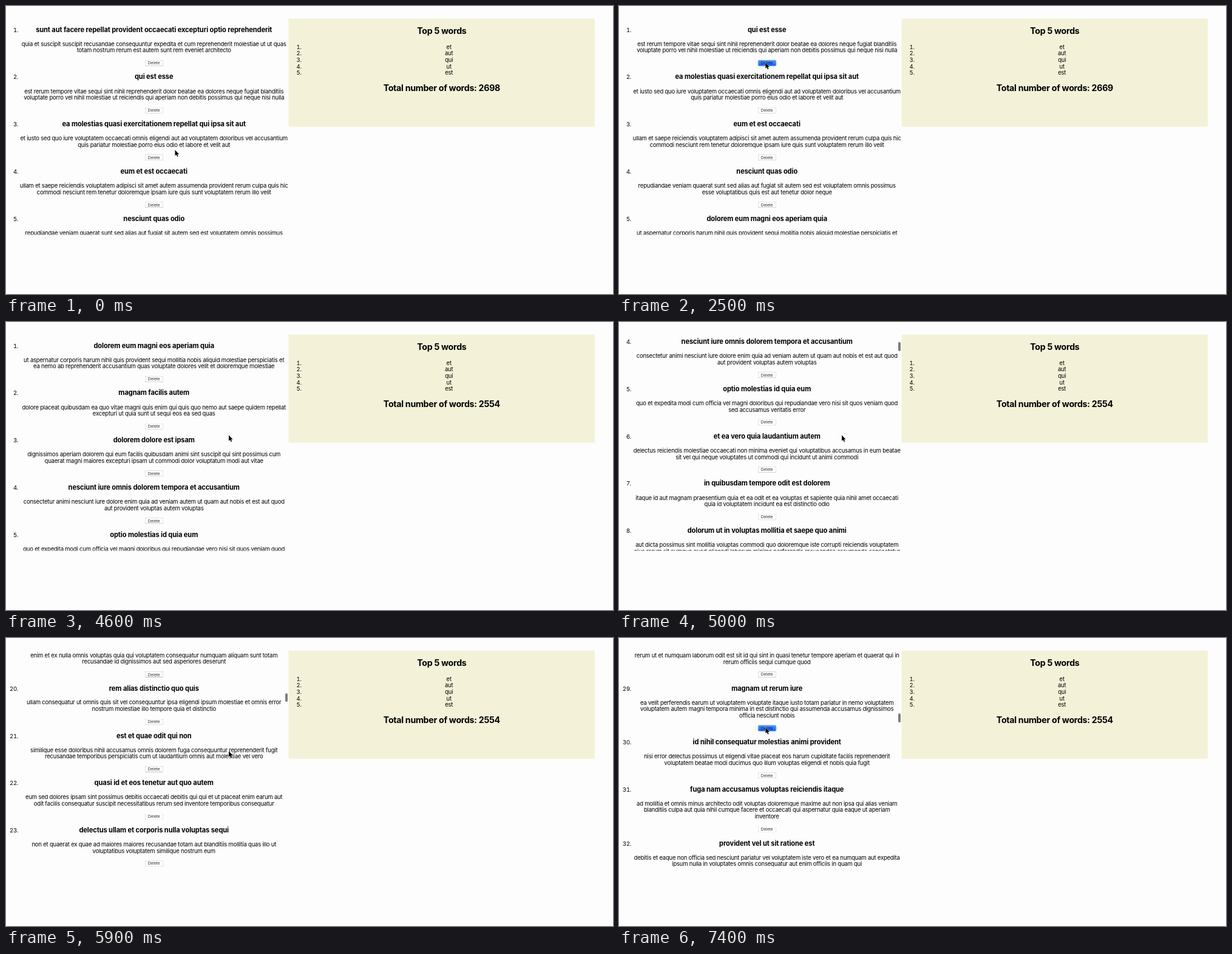
Write an HTML page that moves like this. It is 1000x474 px and loops after 7.5 s.

```html
<!DOCTYPE html>
<html lang="en">
<head>
<meta charset="utf-8">
<title>Word counter</title>
<style>
  html, body { margin: 0; width: 100%; height: 100%; overflow: hidden; background: #fdfdfd; }
  #stage { position: relative; width: 1000px; height: 474px; overflow: hidden; }
  #page {
    position: absolute; left: 0; top: 0; width: 1686px; height: 799px;
    transform: scale(.593); transform-origin: 0 0;
    font: 16px/18px Inter, sans-serif; letter-spacing: -.021em; color: #000; text-align: center;
  }
  #posts { position: absolute; left: -2px; top: 35.4px; width: 786px; height: 600px; overflow: hidden; }
  #posts ol, #stats > * { position: relative; top: 1px; }
  ol { margin: 0; padding: 0 0 0 40px; }
  #posts li { display: flow-root list-item; height: var(--h); }
  h3 { margin: 18.7px 0; font-size: 18.72px; line-height: 22px; letter-spacing: -.009em; }
  p { margin: 0 -20px 16px; white-space: pre; }
  button {
    display: block; box-sizing: border-box; width: 51px; height: 17px; margin: 0 auto; padding: 0;
    position: relative; top: 2px; border: 1px solid #c4c4c4; border-bottom-color: #a8a8a8; border-radius: 4px;
    background: #fff; color: #2a2a2a; font: 11px/14px Inter, sans-serif; letter-spacing: 0;
  }
  button.down { background: linear-gradient(#4f97fb, #1462f2); border-color: #2f74e6; color: #0a1c48; }
  #stats { position: absolute; left: 785px; top: 35.4px; width: 851px; height: 300px; background: #f3f2d8; }
  h2 { margin: 19.9px 0; font-size: 24px; line-height: 28px; letter-spacing: -.022em; }
  #thumb { position: absolute; left: 460px; width: 4.4px; height: 14.5px; border-radius: 2.2px; background: #7d7d7d; }
  #cursor { position: absolute; left: 0; top: 0; width: 10px; height: 14px; overflow: visible; }
</style>
</head>
<body>
<div id="stage">
  <div id="page">
    <div id="posts"><ol id="list"></ol></div>
    <div id="stats">
      <h2>Top 5 words</h2>
      <ol><li>et</li><li>aut</li><li>qui</li><li>ut</li><li>est</li></ol>
      <h2>Total number of words: <span id="total"></span></h2>
    </div>
  </div>
  <div id="thumb"></div>
  <svg id="cursor"><path d="M0 0V9.4L2.1 7.5 3.6 10.9 5.2 10.2 3.7 6.9H6.6Z" fill="#000" stroke="#fff" stroke-width=".8" paint-order="stroke"/></svg>
</div>
<script>
// One post per block: title, then the lines of its body.
const POSTS = `sunt aut facere repellat provident occaecati excepturi optio reprehenderit
quia et suscipit suscipit recusandae consequuntur expedita et cum reprehenderit molestiae ut ut quas
totam nostrum rerum est autem sunt rem eveniet architecto

qui est esse
est rerum tempore vitae sequi sint nihil reprehenderit dolor beatae ea dolores neque fugiat blanditiis
voluptate porro vel nihil molestiae ut reiciendis qui aperiam non debitis possimus qui neque nisi nulla

ea molestias quasi exercitationem repellat qui ipsa sit aut
et iusto sed quo iure voluptatem occaecati omnis eligendi aut ad voluptatem doloribus vel accusantium
quis pariatur molestiae porro eius odio et labore et velit aut

eum et est occaecati
ullam et saepe reiciendis voluptatem adipisci sit amet autem assumenda provident rerum culpa quis hic
commodi nesciunt rem tenetur doloremque ipsam iure quis sunt voluptatem rerum illo velit

nesciunt quas odio
repudiandae veniam quaerat sunt sed alias aut fugiat sit autem sed est voluptatem omnis possimus
esse voluptatibus quis est aut tenetur dolor neque

dolorem eum magni eos aperiam quia
ut aspernatur corporis harum nihil quis provident sequi mollitia nobis aliquid molestiae perspiciatis et
ea nemo ab reprehenderit accusantium quas voluptate dolores velit et doloremque molestiae

magnam facilis autem
dolore placeat quibusdam ea quo vitae magni quis enim qui quis quo nemo aut saepe quidem repellat
excepturi ut quia sunt ut sequi eos ea sed quas

dolorem dolore est ipsam
dignissimos aperiam dolorem qui eum facilis quibusdam animi sint suscipit qui sint possimus cum
quaerat magni maiores excepturi ipsam ut commodi dolor voluptatum modi aut vitae

nesciunt iure omnis dolorem tempora et accusantium
consectetur animi nesciunt iure dolore enim quia ad veniam autem ut quam aut nobis et est aut quod
aut provident voluptas autem voluptas

optio molestias id quia eum
quo et expedita modi cum officia vel magni doloribus qui repudiandae vero nisi sit quos veniam quod
sed accusamus veritatis error

et ea vero quia laudantium autem
delectus reiciendis molestiae occaecati non minima eveniet qui voluptatibus accusamus in eum beatae
sit vel qui neque voluptates ut commodi qui incidunt ut animi commodi

in quibusdam tempore odit est dolorem
itaque id aut magnam praesentium quia et ea odit et ea voluptas et sapiente quia nihil amet occaecati
quia id voluptatem incidunt ea est distinctio odio

dolorum ut in voluptas mollitia et saepe quo animi
aut dicta possimus sint mollitia voluptas commodi quo doloremque iste corrupti reiciendis voluptatem
eius rerum sit cumque quod eligendi laborum minima perferendis recusandae assumenda consectetur
porro architecto ipsum ipsam

voluptatem eligendi optio
fuga et accusamus dolorum perferendis illo voluptas non doloremque neque facere ad qui dolorum
molestiae beatae sed aut voluptas totam sit illum

eveniet quod temporibus
reprehenderit quos placeat velit minima officia dolores impedit repudiandae molestiae nam voluptas
recusandae quis delectus officiis harum fugiat vitae

sint suscipit perspiciatis velit dolorum rerum ipsa laboriosam odio
suscipit nam nisi quo aperiam aut asperiores eos fugit maiores voluptatibus quia voluptatem quis ullam
qui in alias quia est consequatur magni mollitia accusamus ea nisi voluptate dicta

fugit voluptas sed molestias voluptatem provident
eos voluptas et aut odit natus earum aspernatur fuga molestiae ullam deserunt ratione qui eos qui nihil
ratione nemo velit ut aut id quo

voluptate et itaque vero tempora molestiae
eveniet quo quis laborum totam consequatur non dolor ut et est repudiandae est voluptatem vel debitis
et magnam

adipisci placeat illum aut reiciendis qui
illum quis cupiditate provident sit magnam ea sed aut omnis veniam maiores ullam consequatur atque
adipisci quo iste expedita sit quos voluptas

doloribus ad provident suscipit at
qui consequuntur ducimus possimus quisquam amet similique suscipit porro ipsam amet eos veritatis
officiis exercitationem vel fugit aut necessitatibus totam omnis rerum consequatur expedita quidem
cumque explicabo

asperiores ea ipsam voluptatibus modi minima quia sint
repellat aliquid praesentium dolorem quo sed totam minus non itaque nihil labore molestiae sunt dolor
eveniet hic recusandae veniam tempora et tenetur expedita sunt

dolor sint quo a velit explicabo quia nam
eos qui et ipsum ipsam suscipit aut sed omnis non odio expedita earum mollitia molestiae aut atque
rem suscipit nam impedit esse

maxime id vitae nihil numquam
veritatis unde neque eligendi quae quod architecto quo neque vitae est illo sit tempora doloremque
fugit quod et et vel beatae sequi ullam sed tenetur perspiciatis

autem hic labore sunt dolores incidunt
enim et ex nulla omnis voluptas quia qui voluptatem consequatur numquam aliquam sunt totam
recusandae id dignissimos aut sed asperiores deserunt

rem alias distinctio quo quis
ullam consequatur ut omnis quis sit vel consequuntur ipsa eligendi ipsum molestiae et omnis error
nostrum molestiae illo tempore quia et distinctio

est et quae odit qui non
similique esse doloribus nihil accusamus omnis dolorem fuga consequuntur reprehenderit fugit
recusandae temporibus perspiciatis cum ut laudantium omnis aut molestiae vel vero

quasi id et eos tenetur aut quo autem
eum sed dolores ipsam sint possimus debitis occaecati debitis qui qui et ut placeat enim earum aut
odit facilis consequatur suscipit necessitatibus rerum sed inventore temporibus consequatur

delectus ullam et corporis nulla voluptas sequi
non et quaerat ex quae ad maiores maiores recusandae totam aut blanditiis mollitia quas illo ut
voluptatibus voluptatem similique nostrum eum

iusto eius quod necessitatibus culpa ea
odit magnam ut saepe sed non qui tempora atque nihil accusamus illum doloribus illo dolor eligendi
repudiandae odit magni similique sed cum maiores

a quo magni similique perferendis
alias dolor cumque impedit blanditiis non eveniet odio maxime blanditiis amet eius quis tempora quia
autem rem a provident perspiciatis quia

ullam ut quidem id aut vel consequuntur
debitis eius sed quibusdam non quis consectetur vitae impedit ut qui consequatur sed aut in quidem
sit nostrum et maiores adipisci atque quaerat voluptatem adipisci repudiandae

doloremque illum aliquid sunt
deserunt eos nobis asperiores et hic est debitis repellat molestiae optio nihil ratione ut eos beatae
quibusdam distinctio maiores earum voluptates et aut adipisci ea maiores voluptas maxime

qui explicabo molestiae dolorem
rerum ut et numquam laborum odit est sit id qui sint in quasi tenetur tempore aperiam et quaerat qui in
rerum officiis sequi cumque quod

magnam ut rerum iure
ea velit perferendis earum ut voluptatem voluptate itaque iusto totam pariatur in nemo voluptatem
voluptatem autem magni tempora minima in est distinctio qui assumenda accusamus dignissimos
officia nesciunt nobis

id nihil consequatur molestias animi provident
nisi error delectus possimus ut eligendi vitae placeat eos harum cupiditate facilis reprehenderit
voluptatem beatae modi ducimus quo illum voluptas eligendi et nobis quia fugit

fuga nam accusamus voluptas reiciendis itaque
ad mollitia et omnis minus architecto odit voluptas doloremque maxime aut non ipsa qui alias veniam
blanditiis culpa aut quia nihil cumque facere et occaecati qui aspernatur quia eaque ut aperiam
inventore

provident vel ut sit ratione est
debitis et eaque non officia sed nesciunt pariatur vel voluptatem iste vero et ea numquam aut expedita
ipsum nulla in voluptates omnis consequatur aut enim officiis in quam qui`;

const LOOP = 7500, STEP = 100, SCALE = .593;
const TOTALS = [2698, 2669, 2638, 2606, 2577, 2554];
// [press, release]; each release but the last deletes the first post.
const CLICKS = [[1700, 2000], [2300, 2600], [3000, 3200], [3600, 3800], [4000, 4200], [7100, LOOP]];
const SCROLL = [[4700, 0], [4800, 22], [4900, 120], [5000, 240], [5100, 300], [5300, 300], [5400, 390], [5500, 586.2],
  [5700, 1130], [5900, 1455.5], [6000, 1530], [6100, 1570], [6200, 1780], [6300, 2010], [6400, 2125], [6500, 2155.6]];
const POINTER = [[0, 278.5, 237], [200, 225, 205], [400, 173, 150], [600, 205, 112], [800, 240.5, 95.5], [900, 241, 93.8],
  [1000, 241, 93.8], [1100, 241.3, 93.3], [4200, 241.3, 93.3], [4300, 262, 110], [4400, 310, 150], [4500, 352, 180],
  [4600, 367, 186.3], [6400, 367, 186.3], [6500, 327, 182.5], [6700, 268, 160], [6900, 241.5, 147.5]];

const $ = id => document.getElementById(id);
const list = $('list'), thumb = $('thumb'), cursor = $('cursor'), total = $('total');

const add = (parent, tag, text = '') => {
  const el = parent.appendChild(document.createElement(tag));
  el.textContent = text;
  return el;
};

const items = POSTS.split('\n\n').map(post => {
  const [title, ...lines] = post.split('\n');
  const li = add(list, 'li');
  li.style.setProperty('--h', 95.2 + 18 * lines.length + 'px');
  add(li, 'h3', title);
  add(li, 'p', lines.join('\n'));
  return { li, button: add(li, 'button', 'Delete') };
});

// Linear interpolation through rows of [time, ...values].
function at(keys, t) {
  const i = keys.findIndex(k => k[0] > t);
  if (i === 0) return keys[0].slice(1);
  if (i < 0) return keys[keys.length - 1].slice(1);
  const a = keys[i - 1], b = keys[i], u = (t - a[0]) / (b[0] - a[0]);
  return a.slice(1).map((v, n) => v + (b[n + 1] - v) * u);
}

function draw(time) {
  const t = Math.floor(time % LOOP / STEP) * STEP;
  const gone = CLICKS.filter(c => t >= c[1]).length;
  const pressed = CLICKS.some(c => t >= c[0] && t < c[1]);
  const target = t < 5000 ? gone : gone + 28;
  items.forEach(({ li, button }, i) => {
    li.style.display = i < gone ? 'none' : '';
    button.className = pressed && i === target ? 'down' : '';
  });
  total.textContent = TOTALS[gone];

  const [y] = at(SCROLL, t), [cx, cy] = at(POINTER, t);
  list.style.transform = `translateY(${-y / SCALE}px)`;
  thumb.style.display = y > 0 ? '' : 'none';
  thumb.style.top = 22 + y * .0474 + 'px';
  cursor.style.transform = `translate(${cx}px, ${cy}px)`;
}

const start = performance.now();
(function tick() {
  draw(performance.now() - start);
  requestAnimationFrame(tick);
})();
</script>
</body>
</html>
```
